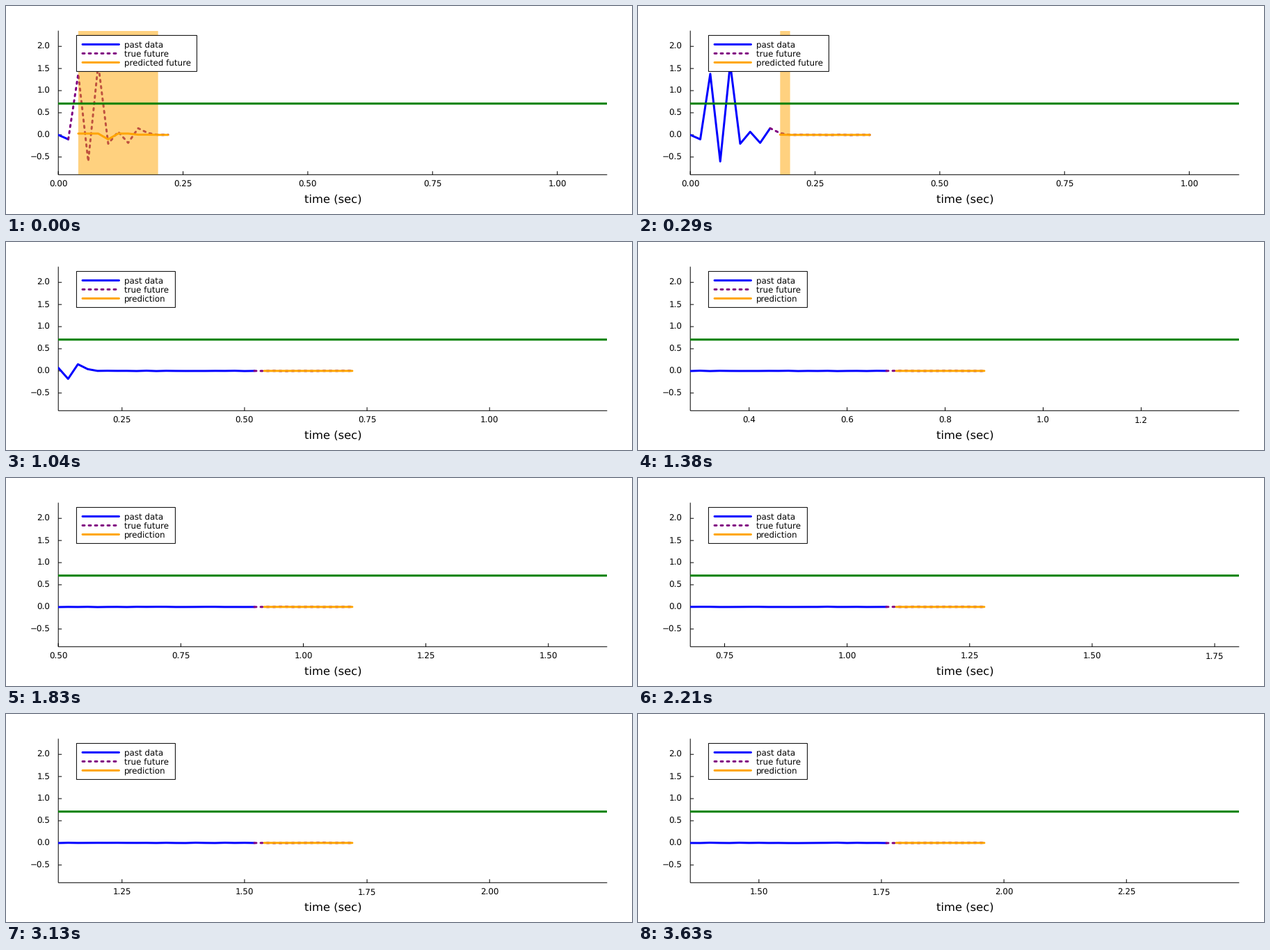
A matplotlib script that plays this animation: 900x300 px, repeating every 3.68 s.

```python
import numpy as np
import matplotlib.pyplot as plt
from matplotlib.animation import FuncAnimation
from matplotlib.patches import Rectangle

W, H, DPI = 900, 300, 100
LEFT, RIGHT, TOP, BOTTOM = 75.2, 864.3, 35.6, 243.3
ZERO_Y, UNIT = 185.9, 63.84          # pixel row of y = 0, pixels per unit
DT, HORIZON, STEPS = 0.02, 10, 88
TICK_MS, LOOP_MS = 10, 3680
PT = 72 / DPI                        # points per pixel
SMALL, LARGE = 11.9 * PT, 16.4 * PT
THICK = 3 * PT
DASH = (0, (1, 2))

plt.rcParams.update({"font.family": "DejaVu Sans", "path.snap": False,
                     "text.hinting": "no_hinting"})

# signal: a short burst followed by faint noise
rng = np.random.default_rng(4)
t = np.round(np.arange(STEPS + HORIZON + 2) * DT, 2)
signal = rng.normal(0, 0.002, t.size)
signal[:11] = [0, -0.1, 1.38, -0.6, 1.6, -0.2, 0.07, -0.18, 0.15, 0.04, 0]
forecast = np.zeros(t.size)
forecast[2:10] = [0.03, 0.03, 0.03, -0.1, 0.03, 0.03, 0.005, 0.005]
BURST_END = 0.2

# 24 steps per second, rounded to hundredths of a second
starts = np.floor(np.arange(STEPS) * 12.5 / 3 + 0.5) * 10

fig = plt.figure(figsize=(W / DPI, H / DPI), dpi=DPI, facecolor="white")


def pixel_axes(z):
    ax = fig.add_axes([0, 0, 1, 1], zorder=z)
    ax.set(xlim=(0, W), ylim=(H, 0))
    ax.axis("off")
    return ax


def thin(ax, x, y):
    line, = ax.plot(x, y, color="black", lw=PT, solid_capstyle="butt")
    return line


def thick(ax, x, y, color, **style):
    line, = ax.plot(x, y, color=color, lw=THICK, solid_capstyle="round",
                    dash_capstyle="round", solid_joinstyle="round",
                    dash_joinstyle="round", **style)
    return line


# frame of the chart
back = pixel_axes(0)
thin(back, [LEFT, LEFT], [TOP, BOTTOM])
thin(back, [LEFT, RIGHT], [BOTTOM, BOTTOM])
for v in np.arange(-0.5, 2.1, 0.5):
    y = ZERO_Y - v * UNIT
    thin(back, [LEFT, LEFT + 5], [y, y])
    back.text(63.2, y + 4.1, f"{v:.1f}".replace("-", "\u2212"),
              size=SMALL, ha="right", va="baseline")
back.text(470.2, 284, "time (sec)", size=LARGE, ha="center", va="baseline")
x_ticks = thin(back, [], [])
x_labels = [back.text(0, 261.3, "", size=SMALL, ha="center", va="baseline")
            for _ in range(6)]

# data area
plot = fig.add_axes([LEFT / W, 1 - BOTTOM / H,
                     (RIGHT - LEFT) / W, (BOTTOM - TOP) / H], zorder=1)
plot.set_ylim((ZERO_Y - BOTTOM) / UNIT, (ZERO_Y - TOP) / UNIT)
plot.axis("off")
past = thick(plot, [], [], "blue", zorder=2)
future = thick(plot, [], [], "purple", linestyle=DASH, zorder=3)
band = plot.add_patch(Rectangle((0, -2), 0, 6, fc="orange", alpha=0.5,
                                lw=0, zorder=4))
guess = thick(plot, [], [], "orange", zorder=5)
thick(plot, [-1, 4], [np.sqrt(0.5)] * 2, "green", zorder=6)

# legend
front = pixel_axes(2)
box = front.add_patch(Rectangle((101.4, 42.4), 173, 52, fc="white",
                                ec="black", lw=PT))
legend_texts = []
rows = [("past data", "blue", "-"), ("true future", "purple", DASH),
        ("predicted future", "orange", "-")]
for i, (name, color, style) in enumerate(rows):
    y = 55.4 + 13 * i
    thick(front, [110, 162.5], [y, y], color, linestyle=style)
    legend_texts.append(front.text(170.2, y + 4.4, name, size=SMALL,
                                   va="baseline"))


def tick_values(lo, hi):
    """Five ticks at 0.2 if they fit, else steps of 0.25."""
    for step, digits in ((0.2, 1), (0.25, 2)):
        values = np.arange(20) * step
        values = values[(values >= lo) & (values <= hi)]
        if step == 0.25 or len(values) == 5:
            return values, digits


def update(i):
    k = int(np.searchsorted(starts, i * TICK_MS, side="right")) - 1
    now = k + 1
    end = now + HORIZON + 1
    early = k < 19
    lo = max(0.0, round(t[now] - 0.4, 2))
    hi = 1.1 if early else round(t[now] + 0.72, 2)
    plot.set_xlim(lo, hi)

    past.set_data(t[:now + 1], signal[:now + 1])
    future.set_data(t[now:end], signal[now:end])
    guess.set_data(t[now + 1:end], forecast[now + 1:end])
    band.set_x(t[now + 1])
    band.set_width(max(0, BURST_END - t[now + 1]))
    band.set_visible(t[now + 1] < BURST_END)

    values, digits = tick_values(lo, hi)
    xs = LEFT + (values - lo) / (hi - lo) * (RIGHT - LEFT)
    x_ticks.set_data(np.repeat(xs, 3), [BOTTOM - 5, BOTTOM, np.nan] * len(xs))
    for j, label in enumerate(x_labels):
        shown = j < len(xs)
        label.set_visible(shown)
        if shown:
            label.set_x(xs[j])
            label.set_text(f"{values[j]:.{digits}f}")

    box.set_width(173 if early else 142)
    legend_texts[2].set_text("predicted future" if early else "prediction")
    return []


anim = FuncAnimation(fig, update, frames=LOOP_MS // TICK_MS,
                     interval=TICK_MS, init_func=lambda: update(0),
                     repeat=True, repeat_delay=0, blit=False)
plt.show()
```
